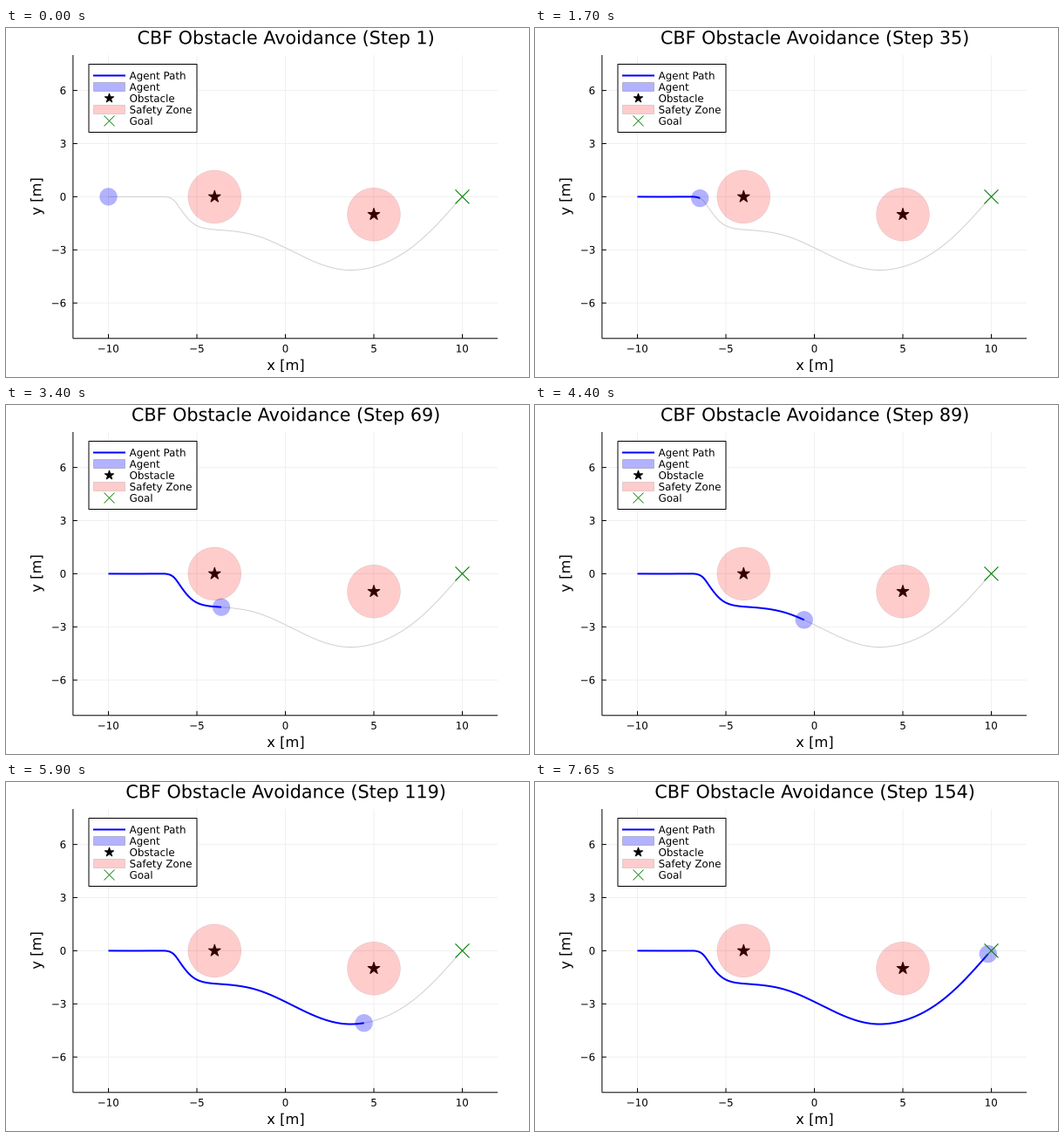
Write a matplotlib script that moves like this. It is 600 px wide and 400 px high and loops after 7700 ms.

```python
import numpy as np
import matplotlib.pyplot as plt
from matplotlib.animation import FuncAnimation
from matplotlib.patches import Circle, PathPatch, Polygon, Rectangle
from matplotlib.textpath import TextPath
from matplotlib.transforms import Affine2D

W, H, DPI = 600, 400, 100
FRAMES, INTERVAL = 154, 50
PT = 72 / DPI  # points per pixel
UNIT, X0, Y0 = 20.3, 320.5, 193.4
LEFT, RIGHT = X0 - 12 * UNIT, X0 + 12 * UNIT
TOP, BOTTOM = Y0 - 8 * UNIT, Y0 + 8 * UNIT
BLUE, RED = (0, 0, 1), (1, 0, 0)
TITLE_SIZE, LABEL_SIZE, TICK_SIZE = 20.72, 16.3, 11.86

plt.rcParams.update({"font.family": "DejaVu Sans", "path.snap": False,
                     "lines.solid_capstyle": "butt"})


def px(x):
    return X0 + UNIT * x


def py(y):
    return Y0 - UNIT * y


def spline(k, v, t):
    """Natural cubic spline through values v at knots k."""
    n, h = len(k), np.diff(k)
    a, b = np.eye(n), np.zeros(n)
    for i in range(1, n - 1):
        a[i, i - 1:i + 2] = h[i - 1], 2 * (h[i - 1] + h[i]), h[i]
        b[i] = 6 * ((v[i + 1] - v[i]) / h[i] - (v[i] - v[i - 1]) / h[i - 1])
    m = np.linalg.solve(a, b)
    i = np.clip(np.searchsorted(k, t, side="right") - 1, 0, n - 2)
    d, s = h[i], (t - k[i]) / h[i]
    r = 1 - s
    return (r * v[i] + s * v[i + 1]
            + d * d / 6 * ((r**3 - r) * m[i] + (s**3 - s) * m[i + 1]))


# Key poses of the agent: step, x, y
KEYS = np.array([(0, -10, 0), (16, -7.7, 0), (32, -6.55, -0.05),
                 (42, -6.17, -0.35), (50, -5.78, -0.9), (58, -5.05, -1.61),
                 (68, -3.62, -1.885), (80, -1.77, -2.16), (96, 0.64, -3.2),
                 (112, 3.35, -4.13), (128, 6.21, -3.46), (153, 9.82, -0.18)])
steps = np.arange(FRAMES)
path_x = px(spline(KEYS[:, 0], KEYS[:, 1], steps))
path_y = py(np.minimum(spline(KEYS[:, 0], KEYS[:, 2], steps), 0))

fig = plt.figure(figsize=(W / DPI, H / DPI), dpi=DPI, facecolor="white")
ax = fig.add_axes([0, 0, 1, 1])
ax.set(xlim=(0, W), ylim=(H, 0))
ax.axis("off")


def line(x, y, color="black", width=1, z=2):
    return ax.plot(x, y, color=color, lw=width * PT, zorder=z)[0]


def glyphs(x, y, text, size, align=0.5, angle=0):
    """Text outline with its baseline at y; align 0, 0.5 or 1."""
    path = TextPath((0, 0), text, size=size)
    box = path.get_extents()
    shift = -(box.x0 + align * box.width) if align else 0
    place = Affine2D().translate(shift, 0).scale(1, -1)
    return place.rotate_deg(angle).translate(x, y).transform_path(path)


def label(*args, **kw):
    return ax.add_patch(PathPatch(glyphs(*args, **kw), facecolor="black",
                                  lw=0, zorder=12))


def star(x, y, r, z):
    a = np.arange(10) * np.pi / 5
    radius = np.where(np.arange(10) % 2, 0.382 * r, r)
    points = np.column_stack([x + radius * np.sin(a), y - radius * np.cos(a)])
    ax.add_patch(Polygon(points, facecolor="black", edgecolor="black",
                         lw=PT, joinstyle="round", zorder=z))


def cross(x, y, r, width, z):
    for s in (-1, 1):
        line([x - r, x + r], [y - s * r, y + s * r], "green", width, z)


def tinted(shape, color, alpha, edge, z):
    shape.set(facecolor=(*color, alpha), edgecolor=(0, 0, 0, alpha),
              linewidth=edge * PT, zorder=z)
    return ax.add_patch(shape)


# Grid, ticks and axes
for v in range(-10, 11, 5):
    x = px(v)
    line([x, x], [TOP, BOTTOM], "#f0f0f0", z=0)
    line([x, x], [BOTTOM - 5, BOTTOM])
    label(x, 371.6, f"{v}".replace("-", "\u2212"), TICK_SIZE)
for v in range(-6, 7, 3):
    y = py(v)
    line([LEFT, RIGHT], [y, y], "#f0f0f0", z=0)
    line([LEFT, LEFT + 5], [y, y])
    label(68.4, y + 4.3, f"{v}".replace("-", "\u2212"), TICK_SIZE, align=1)
line([LEFT, LEFT], [TOP, BOTTOM])
line([LEFT, RIGHT], [BOTTOM, BOTTOM])
label(X0, 392, "x [m]", LABEL_SIZE)
label(40.3, Y0, "y [m]", LABEL_SIZE, angle=-90)
title = label(X0, 18.3, "CBF", TITLE_SIZE)

# Scene
line(path_x, path_y, "#d0d0d0", z=3)
trail = line([], [], "blue", 2, 4)
agent = tinted(Circle((0, 0), 0.5 * UNIT), BLUE, 0.3, 0, 5)
for ox, oy in ((-4, 0), (5, -1)):
    star(px(ox), py(oy), 7.2, 6)
    tinted(Circle((px(ox), py(oy)), 1.5 * UNIT), RED, 0.2, 0.3, 7)
cross(px(10), py(0), 8, 1.1, 8)

# Legend
ax.add_patch(Rectangle((95, 41.5), 124, 78, facecolor="white",
                       edgecolor="black", lw=PT, zorder=9))
row_y = [54.5 + 13 * i for i in range(5)]
for text, y in zip(["Agent Path", "Agent", "Obstacle", "Safety Zone", "Goal"],
                   row_y):
    label(141.6, y + 4.3, text, TICK_SIZE, align=0)
line([100, 137], [row_y[0]] * 2, "blue", 2, 10)
for y, color, alpha in ((row_y[1], BLUE, 0.3), (row_y[3], RED, 0.2)):
    tinted(Rectangle((100.5, y - 5), 36, 10), color, alpha, 0.6, 10)
star(118.5, row_y[2], 5.4, 10)
cross(118.5, row_y[4], 6, 0.8, 10)


def update(i):
    trail.set_data(path_x[:i + 1], path_y[:i + 1])
    agent.center = path_x[i], path_y[i]
    text = f"CBF Obstacle Avoidance (Step {i + 1})"
    title.set_path(glyphs(X0 + 0.3, 18.3, text, TITLE_SIZE))
    return trail, agent, title


anim = FuncAnimation(fig, update, frames=FRAMES, interval=INTERVAL,
                     repeat=True, repeat_delay=0, blit=False)
plt.show()
```
